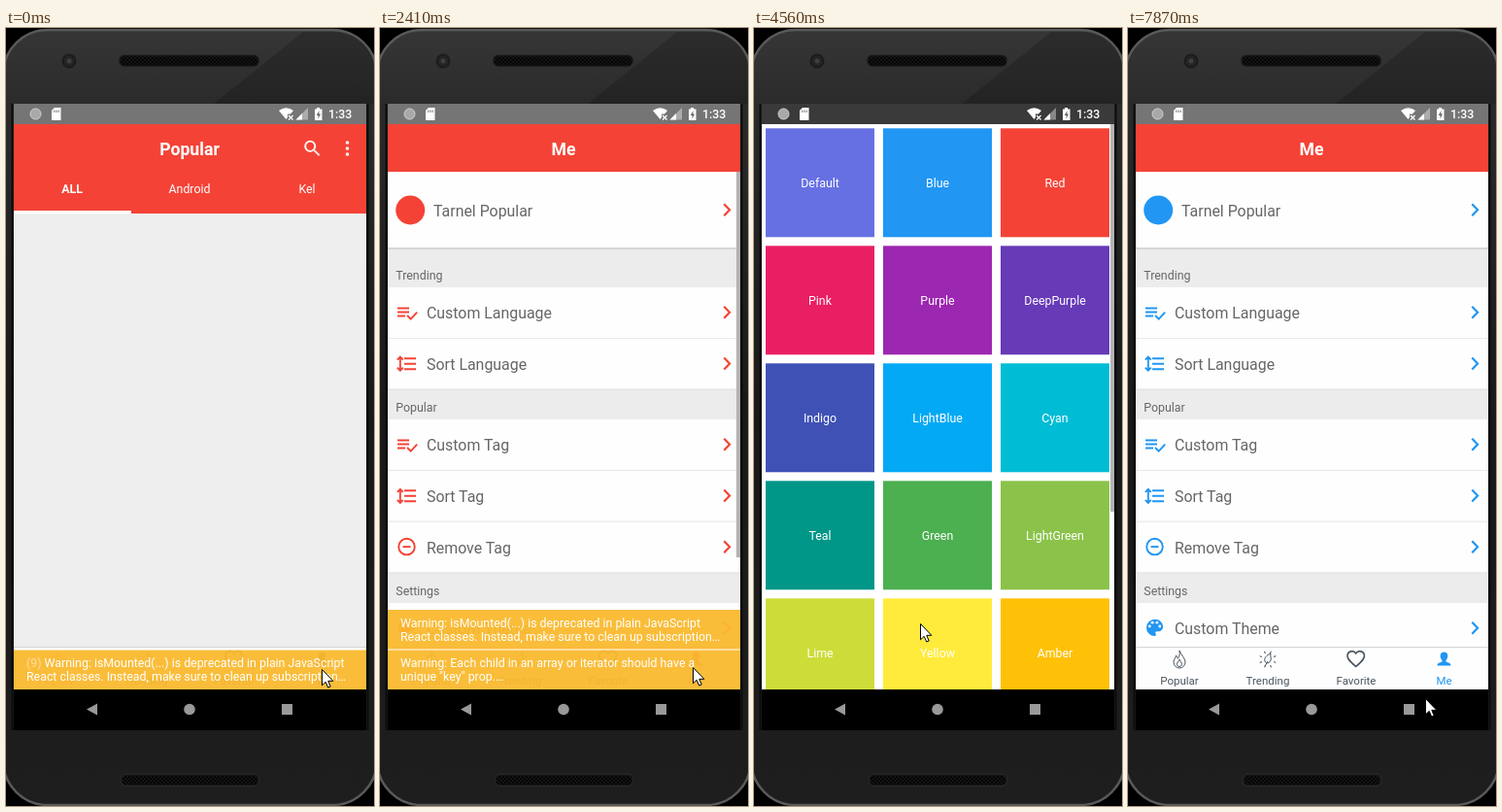
These frames come from a looping animation (379x801 px, 7.99 s). An HTML page:

```html
<!DOCTYPE html>
<html>
<head>
<meta charset="utf-8">
<style>
html, body { margin: 0; width: 100%; height: 100%; overflow: hidden; background: #000; }
svg { display: block; width: 379px; height: 801px; font-family: Roboto, sans-serif; --main: #f44336; }
text { white-space: pre; }
.main { fill: var(--main); }
.line { fill: none; stroke: var(--main); stroke-width: 1.9; }
.thin { fill: none; stroke: #4a5560; stroke-width: 1; }
</style>
</head>
<body>
<svg id="stage" viewBox="0 0 379 801"></svg>
<script>
const LOOP = 7990, RED = '#f44336', BLUE = '#2196f3', GREY = '#666';
const stage = document.getElementById('stage');

const rect = (x, y, w, h, fill, more = '') =>
  `<rect x="${x}" y="${y}" width="${w}" height="${h}" fill="${fill}" ${more}/>`;
const circle = (x, y, r, more = '') => `<circle cx="${x}" cy="${y}" r="${r}" ${more}/>`;
const path = (d, more = '') => `<path d="${d}" ${more}/>`;
// y is the middle of the capitals
const text = (x, y, size, str, more = 'fill="#fff"') =>
  `<text x="${x}" y="${y + size * 0.355}" font-size="${size}" ${more}>${str}</text>`;
const centred = (x, y, size, str, more = 'fill="#fff"') =>
  text(x, y, size, str, 'text-anchor="middle" ' + more);
const group = (id, body, more = '') => `<g id="${id}" ${more}>${body}</g>`;
const BOLD = 'fill="#fff" font-weight="700"';

function phone() {
  const speaker = (x, y, w) =>
    rect(x, y, w, 12.5, '#141414', 'rx="6" stroke="#2c2c2c"') + rect(x + 2, y + 2, w - 4, 9, 'url(#mesh)', 'rx="4"');
  return `<defs>
    <linearGradient id="shell" x2="0" y2="1"><stop stop-color="#363636"/><stop offset=".1" stop-color="#2a2a2a"/>
      <stop offset=".5" stop-color="#191919"/><stop offset="1" stop-color="#1e1e1e"/></linearGradient>
    <pattern id="mesh" width="4" height="4" patternUnits="userSpaceOnUse">
      <path d="M0 0h2v2h-2zM2 2h2v2h-2z" fill="#050505"/></pattern>
    <clipPath id="screen"><rect x="8" y="99" width="363" height="582"/></clipPath>
    <clipPath id="list"><rect x="8" y="99" width="363" height="538"/></clipPath>
    <clipPath id="sheet"><rect id="sheetBox" x="8" y="99" width="363" height="582"/></clipPath></defs>`
    + rect(-3, 2, 385, 798, 'url(#shell)', 'rx="46" stroke="#5a5a5a" stroke-width="2.5"')
    + path('M306 4H340Q375 8 379 40V78H214Z', 'fill="#000" opacity=".18"')
    + path('M6.5 78V723M372.5 78V723', 'stroke="#0c0c0c" stroke-width="2"')
    + circle(65, 34, 6.5, 'fill="#242424" stroke="#1c1c1c" stroke-width="2"') + circle(65, 34, 2.5, 'fill="#3c4043"')
    + speaker(116, 27.5, 145) + speaker(118, 768, 143);
}

function statusIcons() {
  return circle(30.5, 88.5, 5.5, 'fill="#a9a9a9" stroke="#d0d0d0"')
    + path('M50 82H56.5V95H47V85Z', 'fill="#fff"')
    + path('M49.8 84.5v2.5M52 84.5v2.5M54.2 84.5v2.5', 'stroke="#777"')
    + path('M281 85Q288.500 79.500 296 85L293 88.500H290V92L288.500 94Z', 'fill="#fff"')
    + path('M291 90l4.500 4.500M295.500 90l-4.500 4.500', 'stroke="#fff" stroke-width="1.3"')
    + path('M298.500 94.500L311 82V94.500Z', 'fill="#fff" opacity=".4"')
    + path('M298.500 94.500L305 88V94.500Z', 'fill="#fff"')
    + path('M318 83.500H320V82H323V83.500H325.500V95H318Z', 'fill="#fff"')
    + path('M322.500 85L319.800 90H321.500V93.500L324 88.500H322.300Z', 'fill="#666"')
    + text(332, 89, 12.36, '1:33', 'fill="#fff" font-weight="500"');
}

function popularPage() {
  return rect(8, 99, 363, 92, RED) + rect(8, 191, 363, 447, '#eee')
    + centred(189, 124.3, 17.66, 'Popular', BOLD)
    + path('M15.5 14h-.79l-.28-.27A6.47 6.47 0 0 0 16 9.500 6.500 6.500 0 1 0 9.500 16c1.61 0 3.09-.59 4.230-1.570l.27.28v.79l5 4.990L20.490 19zm-6 0a4.500 4.500 0 1 1 0-9 4.500 4.500 0 0 1 0 9z',
      'fill="#fff" transform="translate(304.5 113) scale(.92)"')
    + [118, 124, 130].map(y => circle(351.5, y, 1.8, 'fill="#fff"')).join('')
    + centred(68, 166, 12.36, 'ALL', BOLD) + centred(189, 166, 12.36, 'Android') + centred(310, 166, 12.36, 'Kel')
    + rect(8, 188, 121, 3.2, '#fff');
}

const icons = {
  check: path('M18 288.500H30M18 292.500H30M18 296.500H26M28 296l3.700 3.700 6.500-7', 'class="line"'),
  sort: path('M25 287.500H37M25 293H37M25 298.500H37M20.800 286V300M17.800 289l3-3 3 3M17.800 297l3 3 3-3', 'class="line"'),
  remove: circle(27.5, 292.5, 8.3, 'class="line"') + path('M23.500 292.500H31.500', 'class="line"'),
  palette: `<g transform="translate(16.100 281) scale(.95)">`
    + path('M12 3a9 9 0 0 0 0 18c.83 0 1.500-.67 1.500-1.500 0-.39-.15-.74-.39-1.010-.23-.26-.38-.61-.38-.99 0-.83.67-1.500 1.500-1.500H16c2.760 0 5-2.240 5-5 0-4.420-4.030-8-9-8z', 'class="main"')
    + [[6.5, 10.5], [9.5, 6.5], [14.5, 6.5], [17.5, 10.5]].map(p => circle(...p, 1.5, 'fill="#fff"')).join('') + '</g>'
};
const chevron = y => path(`M354.300 ${y - 6}l5.800 6-5.800 6`, 'class="line" style="stroke-width:2.200"');

function row(y, icon, label) {
  const body = `<g transform="translate(0 ${y - 267})">${icons[icon]}</g>`
    + text(48, y + 26.5, 15.9, label, `fill="${GREY}"`) + chevron(y + 25.7);
  return rect(8, y, 363, 52, '#fefefe') + (icon === 'palette' ? group('theme', body) : body)
    + rect(8, y + 52, 363, 0.8, '#dcdcdc');
}

function mePage() {
  const section = (y, label) => text(16.3, y, 12.36, label, `fill="${GREY}"`);
  return rect(8, 99, 363, 539, '#ececec') + rect(8, 99, 363, 49, RED)
    + centred(189, 124.3, 17.66, 'Me', BOLD)
    + rect(8, 148, 363, 78.3, '#fefefe') + rect(8, 226.3, 363, 1.3, '#cbcbcb')
    + circle(31.2, 187.5, 15, 'class="main"')
    + text(55, 188, 15.9, 'Tarnel Popular', `fill="${GREY}"`) + chevron(187.3)
    + section(254.7, 'Trending') + row(267, 'check', 'Custom Language') + row(319.7, 'sort', 'Sort Language')
    + section(390.7, 'Popular') + row(403, 'check', 'Custom Tag') + row(455.8, 'sort', 'Sort Tag') + row(508.6, 'remove', 'Remove Tag')
    + section(579.7, 'Settings') + row(592, 'palette', 'Custom Theme')
    + group('meBar', rect(367, 148, 4, 397, '#b4b4b4'));
}

function tabBar() {
  const label = (x, str, id) => centred(x, 671.7, 11.5, str, `id="${id}"`);
  const rays = [0, 1, 2, 3, 4, 5, 6, 7].map(i =>
    path('M0 -6.500V-9', `class="thin" transform="translate(144 650) rotate(${i * 45 + 22})"`)).join('');
  return rect(8, 637.5, 363, 43.5, '#fefefe') + rect(8, 637, 363, 1, '#d5d5d8')
    + path('M53 641c2 5 6 8 6 12a6 6 0 0 1-12 0c0-3 2-4 2.500-7 1 1 1.500 2 1.700 3.200 1.800-2 2.400-5 1.800-8.200zM53 650c1 2 2.500 3.500 2.500 5.500a2.700 2.700 0 0 1-5.200 0c0-2 1.700-3 2.700-5.500z', 'id="flame" class="thin"')
    + rays + path('M147 644c-1 3 1 4 0 7s-5 4-6 1 1-6 6-8zM141 657l3-5', 'class="thin"')
    + path('M234.700 657.500C229 652.500 226 650 226 646.500a4.700 4.700 0 0 1 8.700-2.600 4.700 4.700 0 0 1 8.700 2.600C243.400 650 240.400 652.500 234.700 657.500z', 'class="thin" style="stroke-width:1.600"')
    + path('M325.500 642.500c5 0 4.500 6 2 8.500v1.500c2.500 1 5 1.200 5 4h-14c0-2.800 2.500-3 5-4v-1.500c-2.500-2.500-3-8.500 2-8.500z', 'id="person"')
    + label(53, 'Popular', 'popLabel') + label(144, 'Trending', 'trendLabel')
    + label(235, 'Favorite', 'favLabel') + label(325.5, 'Me', 'meLabel');
}

const YELLOW = '#faba30';
const mounted = ['Warning: isMounted(...) is deprecated in plain JavaScript', 'React classes. Instead, make sure to clean up subscription…'];
const keyed = ['Warning: Each child in an array or iterator should have a', 'unique "key" prop.…'];

function warning(id, y, lines, count = '') {
  const prefix = count && `<tspan fill-opacity=".5">${count} </tspan>`;
  return group(id, rect(8, y, 363, 40.5, YELLOW, 'opacity=".95"')
    + text(21, y + 13.2, 12.36, prefix + lines[0]) + text(21, y + 27.5, 12.36, lines[1]));
}

function inspector(id, lines) {
  return group(id, rect(8, 99, 363, 582, YELLOW, 'opacity=".95"')
    + lines.map((s, i) => text(21, 118 + i * 16, 12.36, s)).join('')
    + ['Minimize', 'Dismiss', 'Dismiss All'].map((s, i) => centred(68.5 + i * 121, 661, 12.36, s)).join(''));
}

const swatches = 'Default #6670e2,Blue #2196f3,Red #f44336,Pink #e91e63,Purple #9c27b0,DeepPurple #673ab7,Indigo #3f51b5,LightBlue #03a9f4,Cyan #00bcd4,Teal #009688,Green #4caf50,LightGreen #8bc34a,Lime #cddc39,Yellow #ffeb3b,Amber #ffc107';

function themeSheet() {
  const cells = swatches.split(',').map((s, i) => {
    const [name, fill] = s.split(' '), x = 12 + i % 3 * 121, y = 103.3 + Math.floor(i / 3) * 121;
    return group('cell' + name, rect(x, y, 112, 112, fill) + centred(x + 56, y + 56.5, 12.36, name));
  });
  return rect(8, 99, 363, 640, '#fff') + cells.join('') + group('sheetBar', rect(367, 99, 4, 399, '#b4b4b4'));
}

stage.innerHTML = phone()
  + rect(8, 78, 363, 21.3, '#757575')
  + `<g clip-path="url(#list)">${group('popular', popularPage()) + group('me', mePage())}</g>`
  + tabBar()
  + `<g clip-path="url(#screen)">`
  + warning('warnCount', 640.5, mounted, '(9)') + warning('warnOne', 640.5, mounted)
  + warning('warnUpper', 599, mounted) + warning('warnKey', 640.5, keyed)
  + inspector('inspectMounted', [mounted[0], 'React classes. Instead, make sure to clean up subscriptions', 'and pending requests in componentWillUnmount to', 'prevent memory leaks.'])
  + inspector('inspectKey', [keyed[0], 'unique "key" prop.']) + '</g>'
  + rect(8, 681, 363, 42, '#000')
  + rect(8, 78, 363, 603, '#000', 'id="dim"')
  + `<g clip-path="url(#sheet)">${group('theming', themeSheet())}</g>`
  + `<g fill="#fff" opacity=".6">${path('M83 701.500L94 695.500V707.500Z') + circle(189, 701.5, 5.8) + path('M284 696H295V707H284Z')}</g>`
  + statusIcons()
  + path('M.5.5V16.800L4.200 13.300L6.700 19L9.200 18L6.800 12.300H11.800Z', 'id="cursor" fill="#fff" stroke="#000"');

const at = (steps, t) => steps.filter(s => s[0] <= t).pop();
const el = id => document.getElementById(id);
const show = (id, on) => { el(id).style.display = on ? '' : 'none'; };
const fade = (id, o) => { el(id).style.opacity = o; };

// [time, x, y]
const pointer = [
  [0, 325, 660], [270, 328, 655], [390, 330, 650], [670, 330, 653], [910, 331, 656],
  [1740, 325, 656], [1890, 169, 576], [2010, 197, 621], [2160, 262, 643], [2290, 308, 655], [2410, 322, 658],
  [3110, 326, 654], [3380, 266, 624], [3530, 215, 612], [3650, 182, 606],
  [4320, 171, 613], [4720, 163, 491], [4870, 126, 420], [4990, 133, 394],
  [5140, 165, 330], [5260, 198, 262], [5380, 214, 215], [5500, 202, 180], [5650, 187, 163],
  [6660, 224, 256], [6810, 279, 690], [6970, 207, 684],
  [7120, 150, 470], [7240, 85, 270], [7360, 55, 169], [7510, 54, 168], [7630, 130, 330], [7750, 240, 560], [7870, 306, 690]
];
// [time, sheet offset, dimming]
const slide = [
  [0, 640, 0], [4320, 480, 0.2], [4440, 90, 0.4], [4560, 0, 0.5],
  [6080, 102, 0.36], [6200, 602, 0], [6350, 640, 0]
];

function draw(t) {
  const within = (a, b) => t >= a && t < b;
  const onMe = t >= 1470;
  show('popular', !onMe);
  show('me', onMe);
  show('meBar', t < 3110);
  show('warnCount', t < 120);
  show('inspectMounted', within(120, 670));
  show('warnOne', within(1470, 1590));
  show('warnUpper', within(1590, 2710));
  show('warnKey', within(1590, 2710));
  show('inspectKey', within(2710, 3110));

  stage.style.setProperty('--main', t < 6080 ? RED : BLUE);
  for (const id of ['trendLabel', 'favLabel']) el(id).style.fill = '#4a5560';
  el('popLabel').style.fill = onMe ? '#4a5560' : RED;
  el('flame').style.stroke = onMe ? '#4a5560' : RED;
  for (const id of ['meLabel', 'person']) el(id).style.fill = onMe ? 'var(--main)' : '#4a5560';

  fade('theme', at([[0, 1], [3650, 0.5], [3770, 0.25], [3890, 1]], t)[1]);
  fade('cellBlue', at([[0, 1], [5800, 0.25], [6080, 0.2]], t)[1]);
  fade('sheetBar', at([[0, 1], [5650, 0.5], [5800, 0]], t)[1]);

  const [, offset, dim] = at(slide, t);
  el('theming').setAttribute('transform', `translate(0 ${offset})`);
  el('sheetBox').setAttribute('height', offset ? 624 : 582);
  fade('dim', dim);

  const [, x, y] = at(pointer, t);
  el('cursor').setAttribute('transform', `translate(${x} ${y})`);
}

const start = performance.now();
function tick() {
  draw((performance.now() - start) % LOOP);
  requestAnimationFrame(tick);
}
tick();
</script>
</body>
</html>
```
